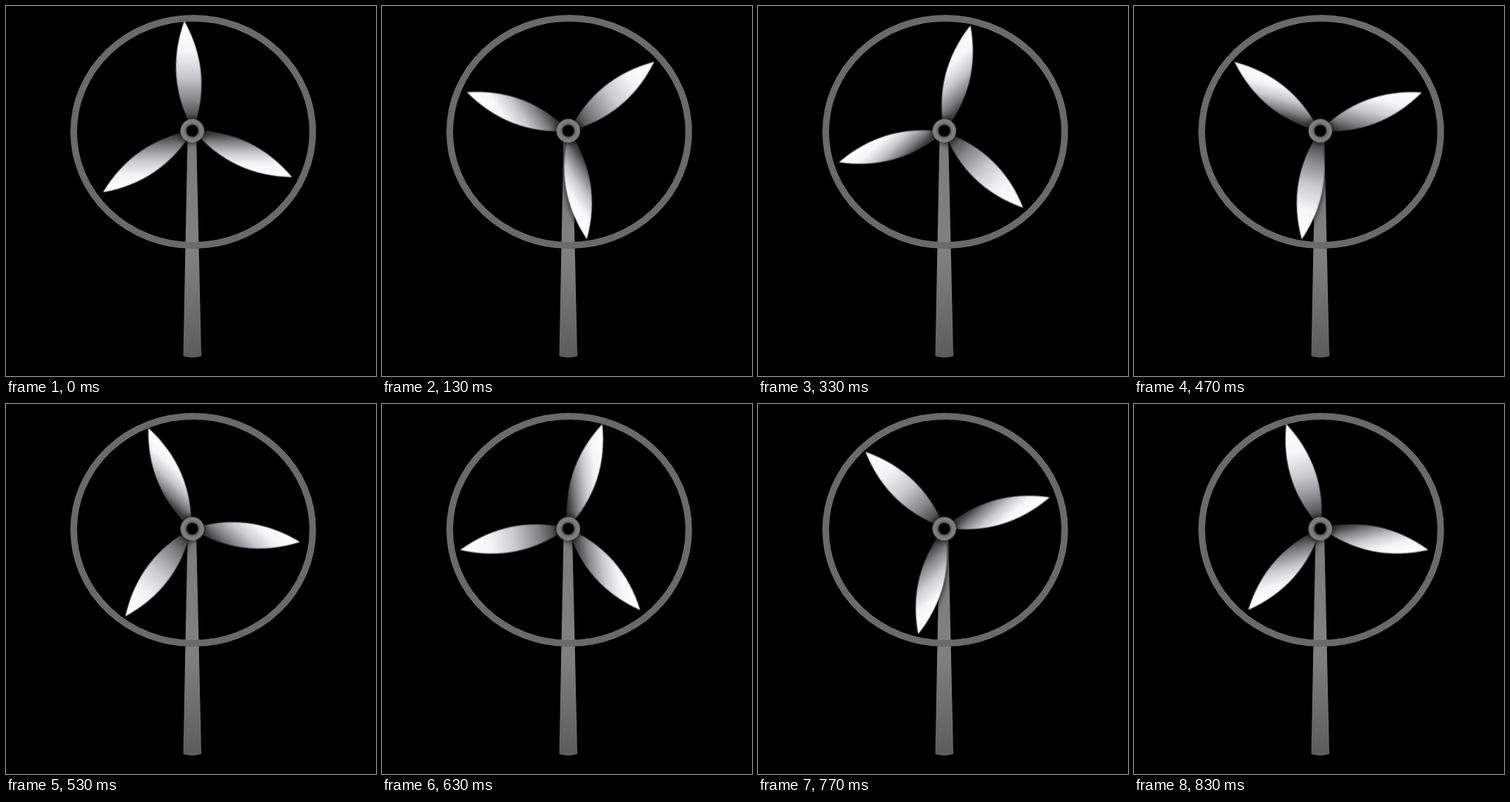
Animation of 500 by 500 pixels, one loop 860 ms. Source, as an HTML page:

```html
<!DOCTYPE html>
<html lang="en">
<head>
<meta charset="utf-8">
<title>Wind turbine</title>
<style>
  html, body { margin: 0; width: 100%; height: 100%; overflow: hidden; background: #000; }
  svg { display: block; width: 100%; height: 100%; }
  .shadow { filter: drop-shadow(0 0 4px #000); }
</style>
</head>
<body>
<svg viewBox="0 0 500 500">
  <defs>
    <linearGradient id="metal">
      <stop offset="0" stop-color="#fff"/>
      <stop offset=".3" stop-color="#f6f6f8"/>
      <stop offset=".55" stop-color="#cbcbce"/>
      <stop offset=".8" stop-color="#848486"/>
      <stop offset="1" stop-color="#3c3c3c"/>
    </linearGradient>
    <!-- All three shade vertically in the rotor's starting pose -->
    <linearGradient id="metalTop" href="#metal" gradientUnits="userSpaceOnUse"
      x1="0" x2="0" y1="-148" y2="-12" gradientTransform="rotate(4.6)"/>
    <linearGradient id="metalRight" href="#metal" gradientUnits="userSpaceOnUse"
      x1="0" x2="0" y1="63" y2="5" gradientTransform="rotate(-115.4)"/>
    <linearGradient id="metalLeft" href="#metal" gradientUnits="userSpaceOnUse"
      x1="0" x2="0" y1="84" y2="7" gradientTransform="rotate(-235.4)"/>
    <linearGradient id="steel" x1="0" y1="0" x2="0" y2="1">
      <stop offset="0" stop-color="#7c7c7c"/>
      <stop offset=".55" stop-color="#808080"/>
      <stop offset="1" stop-color="#5c5c5c"/>
    </linearGradient>
    <radialGradient id="bevel">
      <stop offset=".5" stop-color="#5c5c5c"/>
      <stop offset=".75" stop-color="#808080"/>
      <stop offset="1" stop-color="#7c7c7c"/>
    </radialGradient>
    <path id="blade" d="M0-148Q33.500-74 0 0Q-33.500-74 0-148"/>
  </defs>
  <path d="M245.500 172H257L264 473Q251.500 477 239.500 473Z" fill="url(#steel)"/>
  <ellipse cx="253" cy="170" rx="161.500" ry="153.500" fill="none" stroke="#6a6a6a" stroke-width="9"/>
  <g transform="translate(251.700 168.600)">
    <g class="shadow">
      <g id="rotor">
        <!-- The blades sit slightly off the pivot, so they wobble -->
        <g transform="translate(1.100 -.9)">
          <use href="#blade" fill="url(#metalTop)" transform="rotate(-4.6)"/>
          <use href="#blade" fill="url(#metalRight)" transform="rotate(115.4)"/>
          <use href="#blade" fill="url(#metalLeft)" transform="rotate(235.4)"/>
        </g>
      </g>
    </g>
    <g class="shadow">
      <circle r="16" fill="url(#bevel)"/>
      <circle r="8" fill="#000"/>
    </g>
  </g>
</svg>
<script>
  const LOOP = 860, POSES = 26;
  const rotor = document.getElementById('rotor');

  // 30 poses per second, with switch times rounded to 10 ms
  function draw(now) {
    const time = Math.floor(now % LOOP / 10) * 10;
    const pose = Math.floor((time + 5) * 0.03);
    rotor.setAttribute('transform', `rotate(${pose * 360 / POSES})`);
  }

  function tick() {
    draw(performance.now());
    requestAnimationFrame(tick);
  }
  tick();
</script>
</body>
</html>
```
